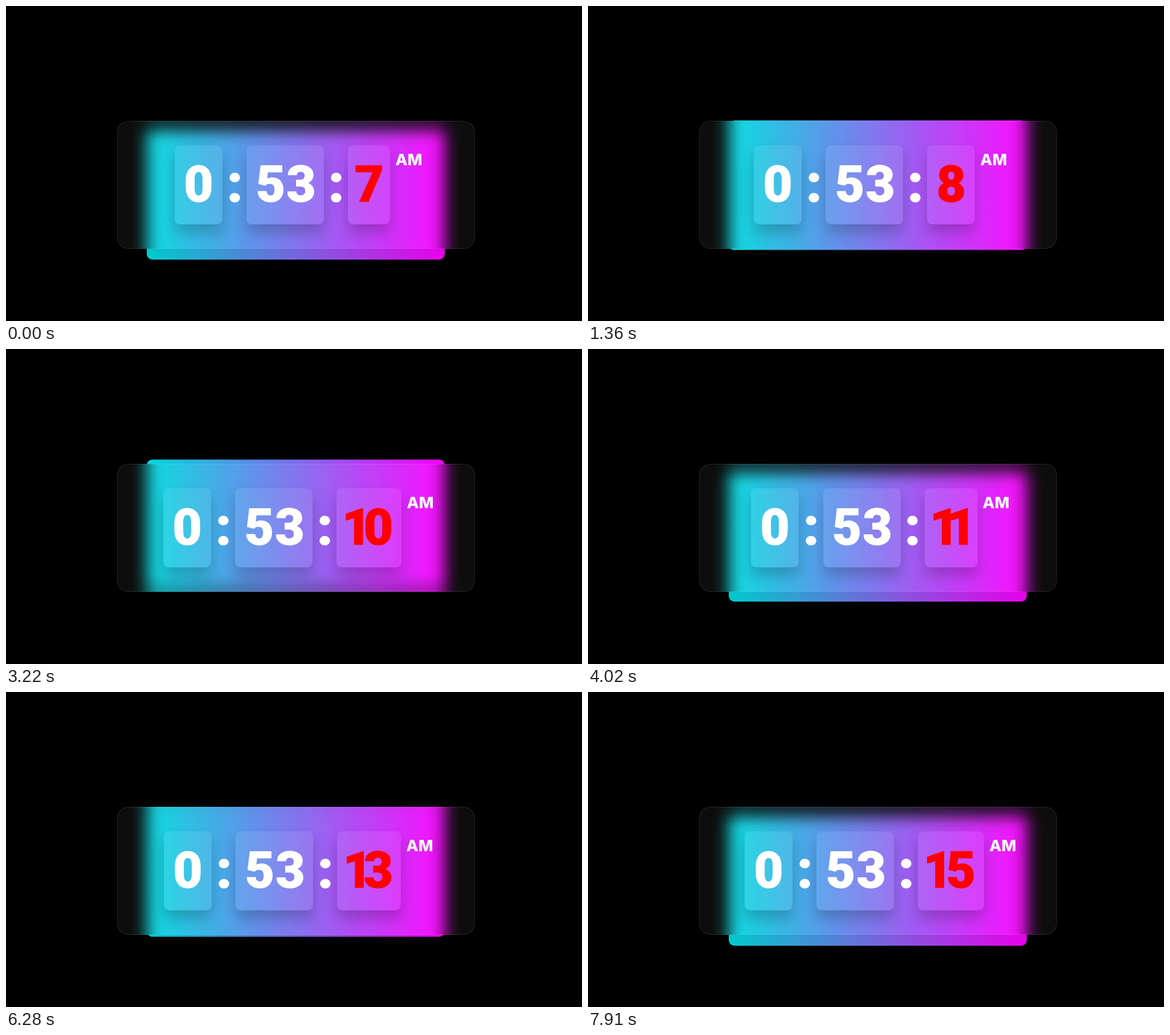
An HTML page that plays this animation: 1011 px wide and 554 px high, repeating every 7.99 s.

```html
<!DOCTYPE html>
<html lang="en">
<head>
<meta charset="utf-8">
<title>Glass clock</title>
<style>
  html, body { margin: 0; width: 100%; height: 100%; overflow: hidden; background: #000; }
  div, svg { position: absolute; box-sizing: border-box; }
  #stage { left: 0; top: 0; width: 1011px; height: 554px; overflow: hidden; background: #000; }
  .glow {
    top: 0; width: 523px; height: 228px;
    background: linear-gradient(90deg, #00dbde, #fc00ff);
  }
  #box { left: 247px; border-radius: 10px; }
  #pane, #glass {
    left: 195px; top: 202px; width: 628px; height: 224.5px; border-radius: 20px;
  }
  #pane { overflow: hidden; background: #000; }
  #haze { left: 52px; top: 0; width: 523px; height: 224.5px; filter: blur(14px); }
  #glass {
    background: rgba(255, 255, 255, .05);
    border: 1px solid rgba(255, 255, 255, .1);
    box-shadow: 0 25px 45px rgba(0, 0, 0, .1);
  }
  #row { left: 0; top: 0; width: 0; height: 0; }
  .card {
    top: 245px; height: 139px; border-radius: 9px;
    background: rgba(255, 255, 255, .08);
    box-shadow: 0 15px 25px rgba(0, 0, 0, .2);
  }
  svg { left: 0; top: 0; overflow: visible; }
  text { fill: #fff; }
  .num {
    font: 900 89px Roboto, Inter, sans-serif;
    text-anchor: middle; stroke: #fff; stroke-width: 1px;
  }
  #sec { fill: #f00; stroke: #f00; }
  #half { font: 800 27.5px Inter, sans-serif; }
</style>
</head>
<body>
<div id="stage">
  <div class="glow" id="box"></div>
  <div id="glass"></div>
  <div id="pane">
    <div id="haze">
      <div class="glow"></div>
      <div class="glow"></div>
      <div class="glow"></div>
    </div>
    <div id="glass" style="left:0;top:0;box-shadow:none"></div>
  </div>
  <div id="row">
    <div class="card" style="left:0;width:84px"></div>
    <div class="card" style="left:126.5px;width:136px"></div>
    <div class="card" id="secCard" style="left:304.5px"></div>
    <svg width="560" height="554">
      <g fill="#fff">
        <ellipse cx="105.5" cy="301.7" rx="9.2" ry="8.4"/>
        <ellipse cx="105.5" cy="337.2" rx="9.2" ry="8.4"/>
        <ellipse cx="283.5" cy="301.7" rx="9.2" ry="8.4"/>
        <ellipse cx="283.5" cy="337.2" rx="9.2" ry="8.4"/>
      </g>
      <text class="num" x="42" y="344">0</text>
      <text class="num" x="168.5 222" y="344">53</text>
      <text class="num" id="sec" y="344"></text>
      <text id="half" y="280">AM</text>
    </svg>
  </div>
</div>
<script>
  const LOOP = 7990, SWING = 1980, SECOND = 990;
  const BOX_Y = 201, BOX_H = 228, PANE_Y = 202, PANE_H = 224.5, CARD_X = 304.5;
  // seconds value: [card width, digit centres from the card centre]
  const LAYOUT = {
    7: [74, 0], 8: [84, 0], 9: [80, 0],
    10: [114, -22, 16], 11: [93, -11.5, 18.5], 12: [109, -19.5, 16],
    13: [112, -20.5, 16], 14: [116, -23, 15], 15: [116, -23.5, 17]
  };
  const el = id => document.getElementById(id);
  const box = el('box'), copies = [...el('haze').children];
  const row = el('row'), card = el('secCard'), sec = el('sec'), half = el('half');
  let shown = 0;

  const moveY = (node, y) => { node.style.transform = `translateY(${y.toFixed(2)}px)`; };

  function showSecond(n) {
    if (n === shown) return;
    shown = n;
    const [w, ...offsets] = LAYOUT[n];
    row.style.left = 295.5 - (w - 74) / 2 + 'px';
    card.style.width = w + 'px';
    sec.textContent = n;
    sec.setAttribute('x', offsets.map(o => CARD_X + w / 2 + o).join(' '));
    half.setAttribute('x', CARD_X + w + 9);
  }

  function draw(t) {
    const y = BOX_Y + 18.6 * Math.cos((t + 130) / SWING * 2 * Math.PI);
    moveY(box, y);
    // the blur sees the box mirrored at the pane's top and bottom edges
    const top = y - PANE_Y, bottom = top + BOX_H;
    [top, -bottom, 2 * PANE_H - bottom].forEach((v, i) => moveY(copies[i], v));
    showSecond(7 + Math.floor((t + 300) / SECOND));
  }

  const start = performance.now();
  function tick() {
    draw((performance.now() - start) % LOOP);
    requestAnimationFrame(tick);
  }
  tick();
</script>
</body>
</html>
```
